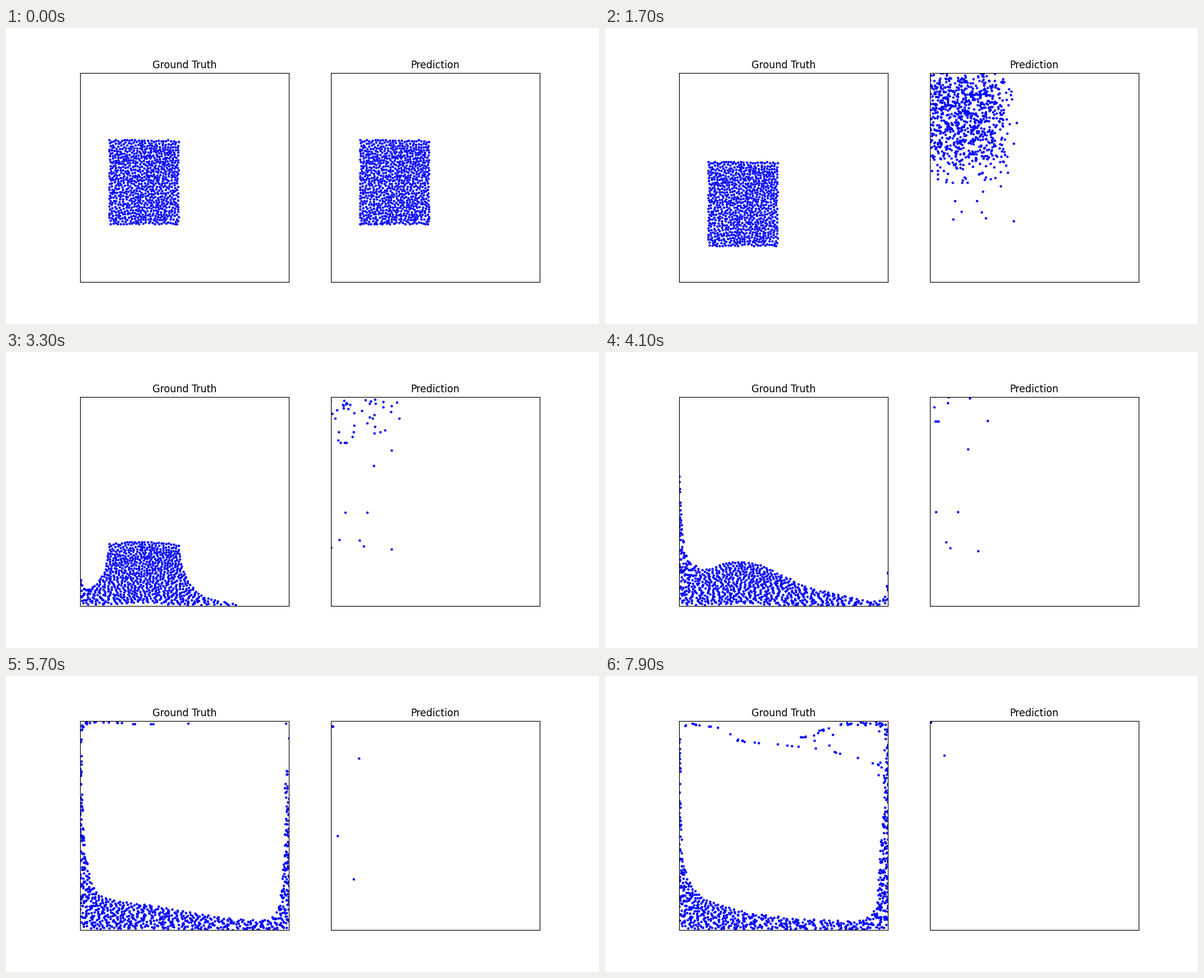
Write a matplotlib script that moves like this. It is 1000 px wide and 500 px high and loops after 8 s.

```python
import numpy as np
import matplotlib.pyplot as plt
from matplotlib.animation import FuncAnimation

FRAMES, INTERVAL = 80, 100
SIZE = 352.27                              # panel side in stage pixels
LEFT, RIGHT, FLOOR = 125.0, 547.73, 428.6
BLOCK = (174, 290.7, 188.8, 331)           # x0, x1, y0, y1

# Fluid grid, lengths in cells and time in frames
N, PAD, SUB = 50, 3.1, 30
CELL = SIZE / (N - 1 - 2 * PAD)
DT = 1 / SUB
GRAVITY = 0.2426 / CELL
STIFF = 32.0

rng = np.random.default_rng(7)


def scatter_block(gap=3.55, darts=26000):
    """Random points in the block, no two closer than gap."""
    x0, x1, y0, y1 = BLOCK
    pts = np.empty((2, 1500))
    n = 0
    for p in rng.uniform((x0, y0), (x1, y1), (darts, 2)):
        near = (pts[0, :n] - p[0]) ** 2 + (pts[1, :n] - p[1]) ** 2
        if n == 0 or near.min() > gap * gap:
            pts[:, n] = p
            n += 1
    return pts[:, :n].copy()


def to_cells(p):
    return np.array([PAD + (p[0] - LEFT) / CELL, PAD + (FLOOR - p[1]) / CELL])


def to_stage(c):
    return np.array([LEFT + (c[0] - PAD) * CELL, FLOOR - (c[1] - PAD) * CELL])


def simulate(start):
    """Weakly compressible water, MLS-MPM; returns positions per frame."""
    x = to_cells(start)
    n = x.shape[1]
    v = np.zeros((2, n))
    v[1] = -0.4 * GRAVITY
    C = np.zeros((2, 2, n))
    J = np.ones(n)
    off = np.arange(3)[:, None]
    out = [to_stage(x)]
    for _ in range(FRAMES - 1):
        for _ in range(SUB):
            base = (x - 0.5).astype(int)
            fx = x - base
            w = np.stack([0.5 * (1.5 - fx) ** 2, 0.75 - (fx - 1) ** 2,
                          0.5 * (fx - 0.5) ** 2])
            wt = w[:, None, 0] * w[None, :, 1]
            dx = (off - fx[0])[:, None]
            dy = (off - fx[1])[None]
            idx = (base[0] + off)[:, None] * N + (base[1] + off)[None]
            flat = idx.ravel()
            mass = np.bincount(flat, wt.ravel(), N * N)
            mass = np.maximum(mass, 1e-9)

            # particles to grid
            push = -4 * DT * STIFF * J * (J - 1)
            C[0, 0] += push
            C[1, 1] += push
            grid = []
            for k in range(2):
                mom = wt * (v[k] + C[k, 0] * dx + C[k, 1] * dy)
                g = np.bincount(flat, mom.ravel(), N * N) / mass
                grid.append(np.clip(g, -4, 4).reshape(N, N))
            gx, gy = grid
            gy -= GRAVITY * DT

            # walls stop inward flow but let water separate
            gx[:4] = np.maximum(gx[:4], 0)
            gx[-4:] = np.minimum(gx[-4:], 0)
            gy[:, :4] = np.maximum(gy[:, :4], 0)
            gy[:, -4:] = np.minimum(gy[:, -4:], 0)

            # grid to particles
            for k, g in enumerate((gx, gy)):
                a = wt * g.ravel()[idx]
                v[k] = a.sum((0, 1))
                C[k, 0] = 4 * (a * dx).sum((0, 1))
                C[k, 1] = 4 * (a * dy).sum((0, 1))
            J = np.clip(J * (1 + DT * (C[0, 0] + C[1, 1])), 0.6, 1.6)
            x = np.clip(x + DT * v, PAD, N - 1 - PAD)
        out.append(to_stage(x))
    return out


def settle(n, a, b, time):
    """Ease from a at frame 0 towards b."""
    return b + (a - b) * np.exp(-(n / time) ** 2)


def strays(n):
    """Particles left behind by the rising cloud."""
    lag = n - 10 * (1 - np.exp(-n / 10))
    pts = [(x - 2.7 * lag, y + 0.45 * lag) for x, y in
           ((713, 322), (666, 317), (659, 307), (625, 306), (611, 319))]
    pts += [(x - 0.023 * n * n, settle(n, 331, 270, 17)) for x in (597, 634)]
    pts += [(settle(n, x, 549, 30), settle(n, 330, 78, 30))
            for x in (600, 622, 634)]
    pts.append((655 - 1.05 * n, settle(n, 330, 134, 30)))
    return np.array(pts).T


def make_rates(start):
    """Speed factor of each predicted particle along x and y."""
    x0, x1, y0, y1 = BLOCK
    n = start.shape[1]
    low = np.exp(-(y1 - start[1]) / 28)
    side = np.exp(-(x1 - start[0]) / 5)
    lag = 0.48 * rng.random(n) * low
    deep = (start[1] - y0) / (y1 - y0)
    ky = (0.95 + 0.15 * deep - lag) * (1 + 0.1 * rng.standard_normal(n))
    kx = (1 + 0.13 * rng.standard_normal(n) - 0.35 * lag
          - 0.5 * rng.uniform(0.5, 1, n) * side)
    return kx, ky


def rise(n):
    return 0.194 * (np.logaddexp(0, (n - 7) / 2) - np.logaddexp(0, -3.5))


def predict(n):
    x = start[0] + RIGHT - LEFT - 95 * kx * (1 - np.exp(-n / 23))
    y = start[1] - 112 * ky * rise(n)
    return np.hstack([[x, y], strays(n)])


start = scatter_block()
kx, ky = make_rates(start)
water = simulate(start)

fig, axes = plt.subplots(1, 2, figsize=(10, 5), dpi=100)
dots = []
for ax, x0, title in zip(axes, (LEFT, RIGHT), ("Ground Truth", "Prediction")):
    ax.set_title(title)
    ax.set_xlim(x0, x0 + SIZE)
    ax.set_ylim(FLOOR, FLOOR - SIZE)
    ax.set_aspect("equal")
    ax.set_xticks([])
    ax.set_yticks([])
    dots += ax.plot([], [], "o", ms=2, color="blue")


def draw(n):
    dots[0].set_data(*water[n])
    dots[1].set_data(*predict(n))
    return dots


anim = FuncAnimation(fig, draw, frames=FRAMES, interval=INTERVAL,
                     init_func=lambda: draw(0), repeat=True)
plt.show()
```
